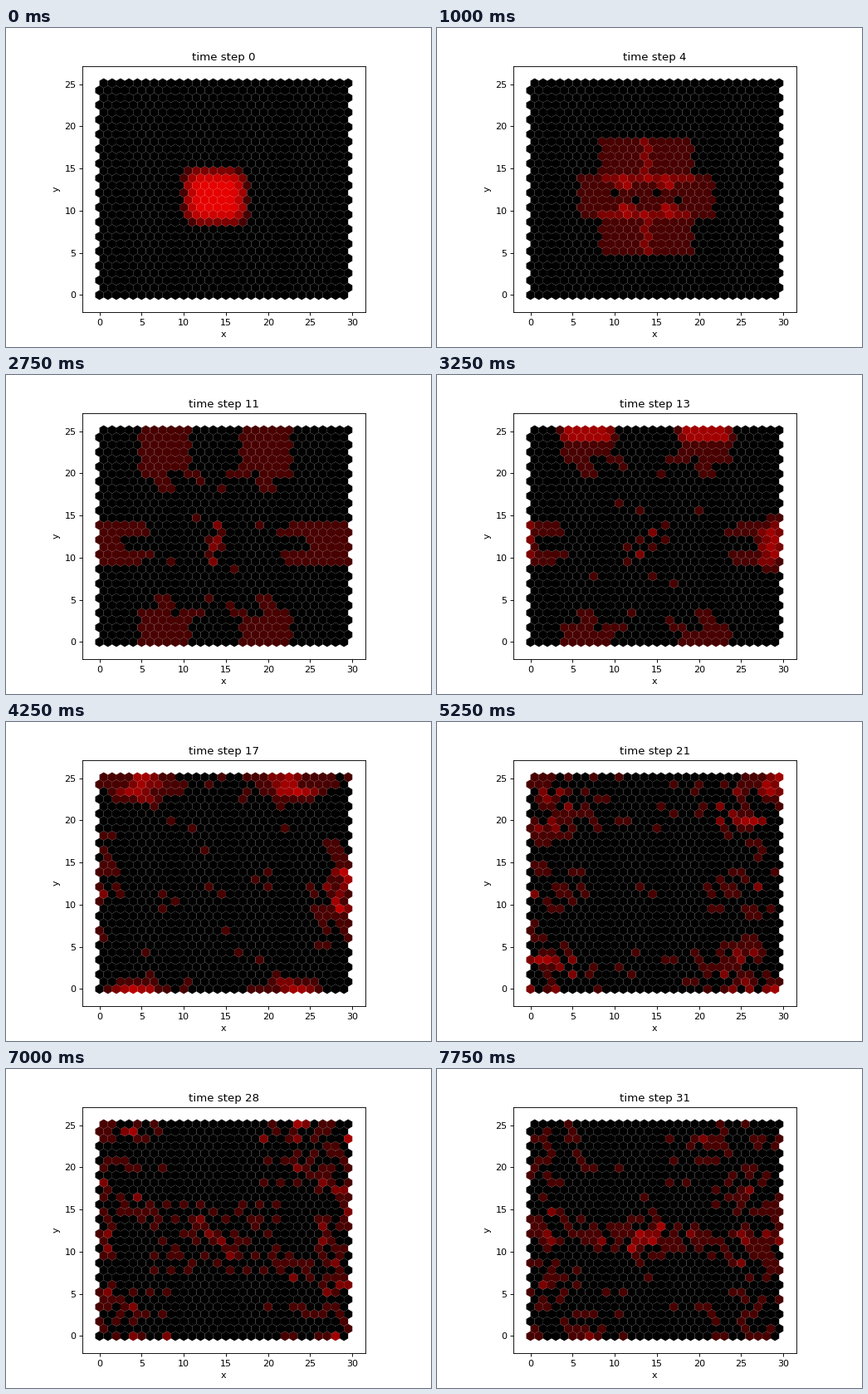
A matplotlib script that plays this animation: 512x384 px, repeating every 8 s.

```python
import numpy as np
import matplotlib.pyplot as plt
from matplotlib.animation import FuncAnimation
from matplotlib.collections import PolyCollection

# Lattice gas on a periodic hexagonal grid, six moving channels plus rest.
# Channels 0..5 point at 0, 60, ... 300 degrees; channel 6 is at rest.
N = 30
STEPS = 32
REST = 6
ROW_H = np.sqrt(3) / 2


def mask(*channels):
    return sum(1 << c for c in channels)


def collision_table():
    table = np.arange(128)

    def rule(before, after, rest_too=True):
        table[mask(*before)] = mask(*after)
        if rest_too:
            table[mask(*before, REST)] = mask(*after, REST)

    for i in range(3):
        rule((i, i + 3), (i + 1, (i + 4) % 6))
    rule((0, 2, 4), (1, 3, 5))
    rule((1, 3, 5), (0, 2, 4))
    for i in range(6):
        sides = ((i - 1) % 6, (i + 1) % 6)
        rule((i, REST), sides, False)
        rule(sides, (i, REST), False)
    return table


TABLE = collision_table()
BITS = (1 << np.arange(7))[:, None, None]


def stream(gas):
    out = gas.copy()
    out[0] = np.roll(gas[0], 1, axis=1)
    out[3] = np.roll(gas[3], -1, axis=1)
    for c, dy in ((1, 1), (2, 1), (4, -1), (5, -1)):
        layer = gas[c].copy()
        if c in (1, 5):
            layer[1::2] = np.roll(layer[1::2], 1, axis=1)
        else:
            layer[::2] = np.roll(layer[::2], -1, axis=1)
        out[c] = np.roll(layer, dy, axis=0)
    return out


def collide(gas):
    codes = TABLE[(gas * BITS).sum(axis=0)]
    return (codes & BITS) // BITS


def simulate():
    gas = np.zeros((7, N, N), dtype=int)
    gas[:, 11:17, 11:17] = 1
    counts = []
    for _ in range(STEPS):
        gas = stream(gas)
        counts.append(gas.sum(axis=0).ravel())
        gas = collide(gas)
    return counts


def colors(count):
    rgb = np.zeros((count.size, 3))
    rgb[:, 0] = 1 - np.exp(-count / 3)
    return rgb


counts = simulate()

row, col = np.divmod(np.arange(N * N), N)
centers = np.column_stack([col + 0.5 * (row % 2), row * ROW_H])
angles = np.pi / 6 + np.arange(6) * np.pi / 3
corners = np.column_stack([np.cos(angles), np.sin(angles)]) / np.sqrt(3)

fig, ax = plt.subplots(figsize=(6.4, 4.8), dpi=80)
cells = PolyCollection(centers[:, None] + corners, linewidths=0)
ax.add_collection(cells)
ax.set_aspect("equal")
ax.set_xlim(-2, N + 1.5)
ax.set_ylim(-2, (N - 1) * ROW_H + 2)
ax.set_xlabel("x")
ax.set_ylabel("y")
title = ax.set_title("time step 0")


def update(step):
    cells.set_facecolor(colors(counts[step]))
    title.set_text(f"time step {step}")
    return cells, title


anim = FuncAnimation(fig, update, frames=STEPS, interval=250,
                     repeat=True, repeat_delay=0, blit=False)
plt.show()
```
